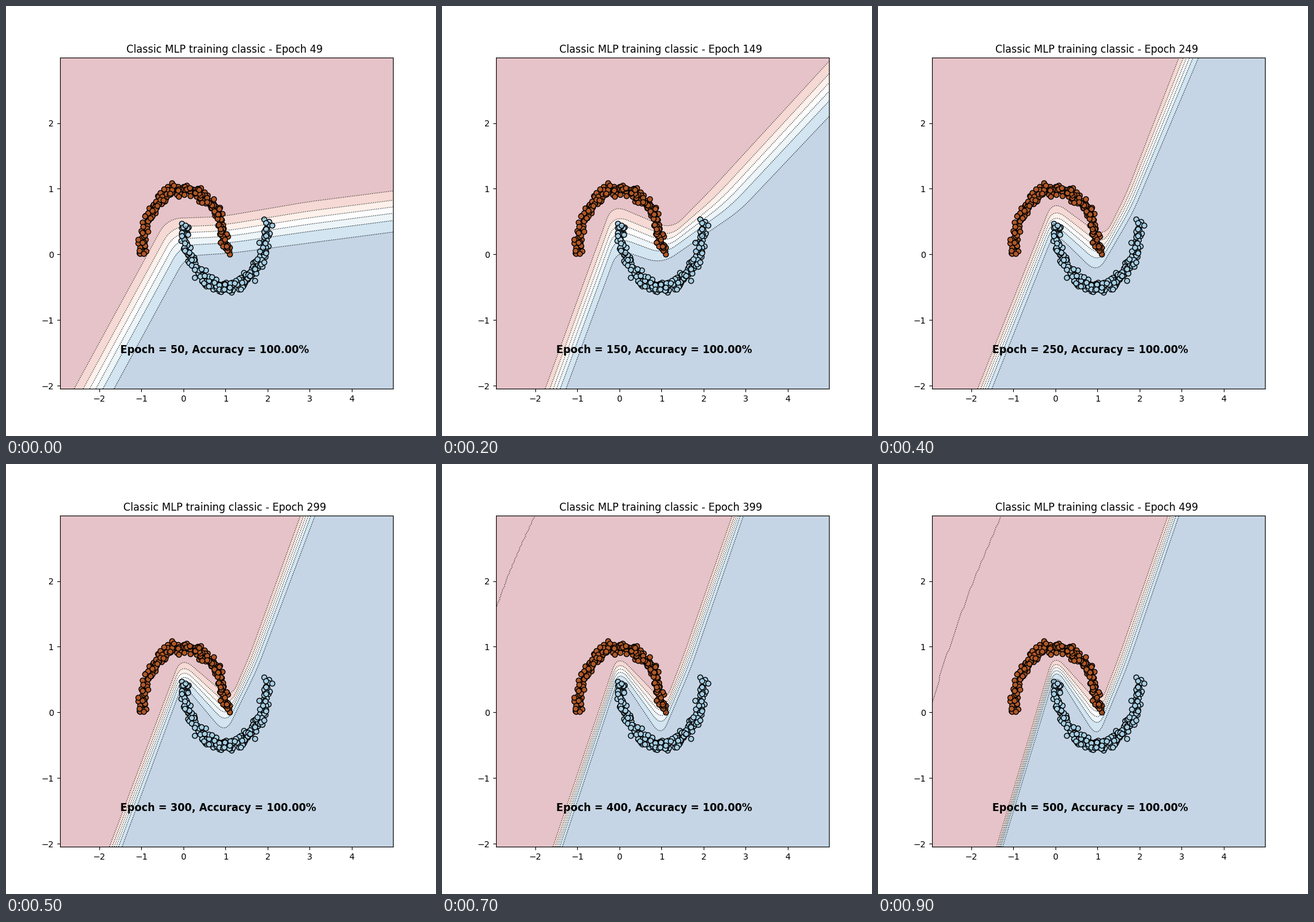
These frames come from a looping animation (700x700 px, 1 s). A matplotlib script:

```python
import numpy as np
import matplotlib.pyplot as plt
from matplotlib.animation import FuncAnimation

FRAMES, INTERVAL, EPOCHS_PER_FRAME = 10, 100, 50
LEFT, RIGHT, TOP, BOTTOM = 87.5, 630, 84, 623   # plot area in pixels
ORIGIN, SCALE = np.array([288.9, 404.4]), np.array([68.5, -106.9])
ALPHA = 0.25

# Key poses of the outermost contours (p = 0.15, p = 0.90) in pixels:
# foot, crest, valley, shoulder, end
POSE_STEPS = [0, 2, 3, 9]
POSES = np.array([
    [[(111, 623), (262, 346), (350, 343), (490, 319), (630, 301)],
     [(176, 623), (293, 407), (370, 402), (500, 385), (630, 368)]],
    [[(168, 623), (277, 323), (374, 364), (440, 297), (630, 90)],
     [(202, 623), (286, 396), (358, 420), (485, 333), (630, 180)]],
    [[(156, 623), (284, 319), (371, 371), (416, 300), (509, 84)],
     [(182, 623), (286, 380), (357, 431), (425, 343), (556, 84)]],
    [[(193, 623), (286, 309), (362, 392), (394, 309), (472, 84)],
     [(203, 623), (289, 339), (357, 447), (406, 329), (490, 84)]],
], float)
SETTLE = np.array([1, 2, 2, 4, 4])[:, None]   # ease-out power per vertex


def to_data(pixels):
    return (np.asarray(pixels, float) - ORIGIN) / SCALE


def pose_at(step):
    """Linear between the early poses, then each vertex settles at its own pace."""
    i = min(np.searchsorted(POSE_STEPS, step, side="right") - 1, len(POSES) - 2)
    u = (step - POSE_STEPS[i]) / (POSE_STEPS[i + 1] - POSE_STEPS[i])
    if i == len(POSES) - 2:
        u = 1 - (1 - u) ** SETTLE
    return POSES[i] + (POSES[i + 1] - POSES[i]) * u


def rounded(points, radius=25):
    """Polyline with each inner corner replaced by a quadratic curve."""
    t = np.linspace(0, 1, 9)[:, None]
    parts = [points[:1]]
    for before, corner, after in zip(points, points[1:], points[2:]):
        a, b = (corner + (p - corner) * min(radius / np.hypot(*(p - corner)), 0.5)
                for p in (before, after))
        parts.append((1 - t) ** 2 * a + 2 * t * (1 - t) * corner + t ** 2 * b)
    return np.vstack(parts + [points[-1:]])


def saturation_edge(step):
    """Slightly stepped line where the probability reaches exactly zero."""
    if step < 6:
        return np.full((2, 2), np.nan)
    x_top, y_left = 127 + 24.5 * (step - 6), 160 + 76.5 * (step - 6)
    s = np.linspace(0, 1, 50)
    bow = 0.02 * (y_left - TOP) * np.sin(np.pi * s)
    x = x_top + (LEFT - x_top) * s - bow
    return to_data(np.column_stack([np.round(x / 2) * 2, TOP + (y_left - TOP) * s]))


def moon(rng, center, sign, count=250, noise=0.05):
    t = np.linspace(0.03, np.pi - 0.03, count)
    arc = np.column_stack([np.cos(t), np.sin(t)]) * sign + center
    jitter = np.clip(rng.normal(size=arc.shape), -2.1, 2.1) * noise
    return rng.permutation(arc + jitter)


# Probability levels are evenly spaced, so the lines sit at their logits
levels = np.arange(1, 7) * 0.15
logits = np.log(levels / (1 - levels))
fractions = (logits - logits[0]) / (logits[-1] - logits[0])
band_colors = [1 - ALPHA + ALPHA * np.array(plt.cm.RdBu((k + 0.5) / 7)[:3])
               for k in range(7)]

fig, ax = plt.subplots(figsize=(7, 7), dpi=100)
(x0, y0), (x1, y1) = to_data([(LEFT, BOTTOM), (RIGHT, TOP)])
ax.set(xlim=(x0, x1), ylim=(y0, y1), facecolor=band_colors[0])
corners = to_data([(RIGHT, TOP), (RIGHT, BOTTOM)])

bands = [ax.fill([0, 1, 1], [0, 0, 1], color=c, lw=0, antialiased=False, zorder=1)[0]
         for c in band_colors[1:]]
lines = [ax.plot([], [], "k:", lw=0.8, zorder=2)[0] for _ in range(7)]

rng = np.random.RandomState(0)
for center, sign, color in (((0, 0), 1, "#b15928"), ((1, 0.5), -1, "#a6cee3")):
    ax.scatter(*moon(rng, center, sign).T, c=color, edgecolors="k", zorder=1.5)

title = ax.set_title("", x=0.495)
label = ax.text(-1.5, -1.5, "", fontsize=12, fontweight="bold")


def update(step):
    outer, inner = map(rounded, pose_at(step))
    for band, line, f in zip(bands, lines, fractions):
        curve = to_data(outer + (inner - outer) * f)
        band.set_xy(np.vstack([curve, corners]))
        line.set_data(*curve.T)
    lines[-1].set_data(*saturation_edge(step).T)
    epoch = (step + 1) * EPOCHS_PER_FRAME
    title.set_text(f"Classic MLP training classic - Epoch {epoch - 1}")
    label.set_text(f"Epoch = {epoch}, Accuracy = 100.00%")
    return [*bands, *lines, title, label]


anim = FuncAnimation(fig, update, frames=FRAMES, interval=INTERVAL, repeat=True)
plt.show()
```
